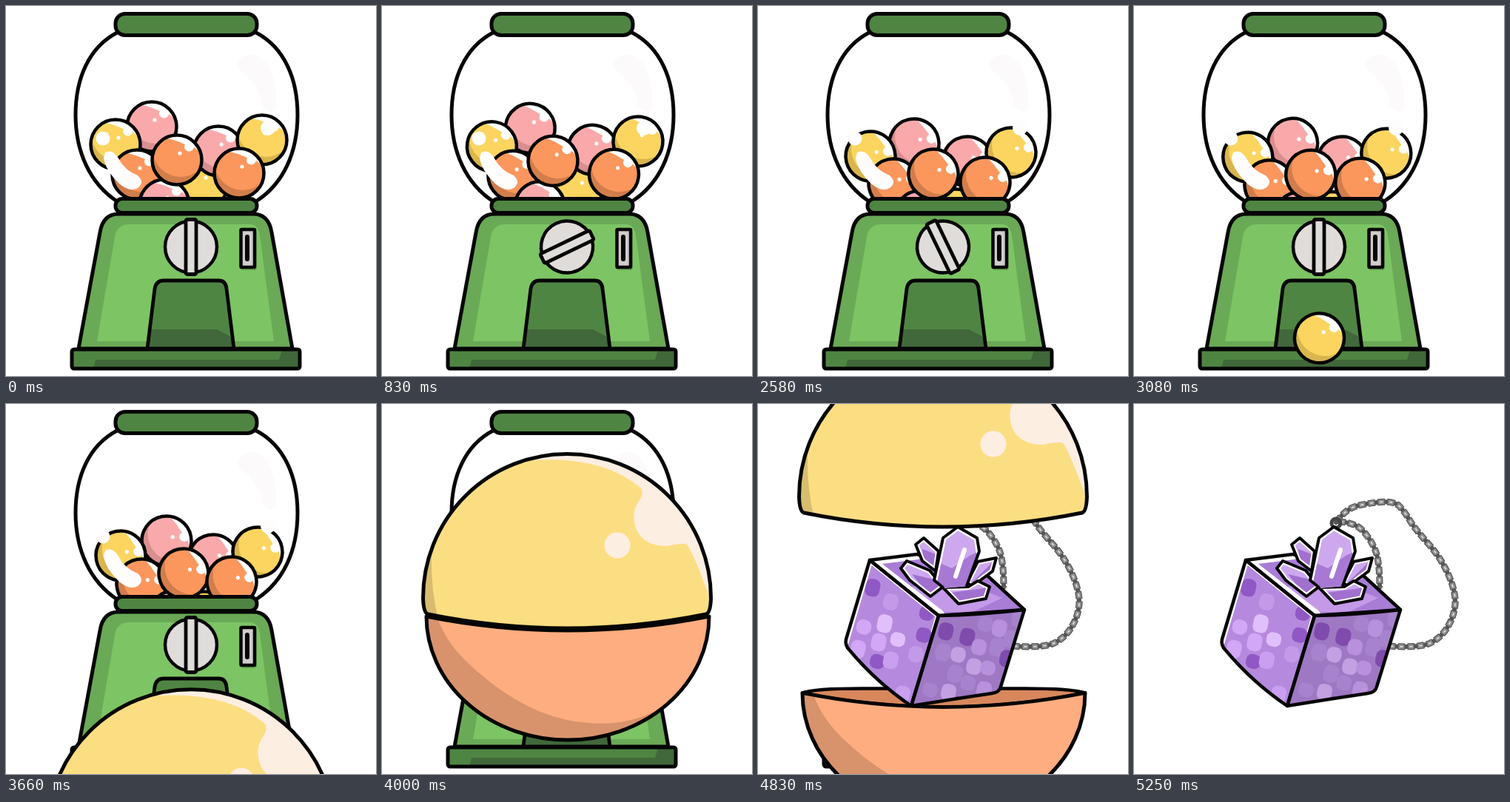
An HTML page with a canvas that plays this animation: 500 by 500 pixels, repeating every 7 s.

```html
<!DOCTYPE html>
<html lang="en">
<head>
<meta charset="utf-8">
<title>Gumball machine</title>
<style>
html, body { margin: 0; width: 100%; height: 100%; overflow: hidden; background: #fff; }
canvas { display: block; width: 500px; height: 500px; }
</style>
</head>
<body>
<canvas id="c" width="500" height="500"></canvas>
<script>
const ctx = document.getElementById('c').getContext('2d');
const LOOP = 7000, STEP = 1000 / 12;
const INK = '#050505', GREEN = '#4f8542', DEEP = '#41683a', METAL = '#dfdcda';
const TONES = {
  pink: ['#faa9ab', '#d98e8f'],
  orange: ['#fb975c', '#d27d4b'],
  yellow: ['#fbd55f', '#d9b54e']
};

// Ball centres at the steps in KEYS, back to front.
const KEYS = [4, 19, 31, 41];
const BALLS = [
  ['pink', [197, 205, 211, 217], [163, 169, 186, 185]],
  ['yellow', [148, 149, 152, 155], [187, 194, 203, 205]],
  ['orange', [177, 177, 183, 183], [228, 231, 240, 243]],
  ['yellow', [266, 264, 267, 267], [241, 257, 281, 287]],
  ['pink', [287, 281, 283, 280], [196, 192, 210, 210]],
  ['pink', [214, 212, 219, 227], [268, 275, 283, 286]],
  ['yellow', [346, 346, 342, 340], [181, 186, 198, 200]],
  ['orange', [231, 231, 237, 240], [208, 211, 227, 229]],
  ['orange', [315, 311, 307, 305], [226, 229, 238, 240]]
];
const TILT = [0, 0.35, 0.55, 0.6];

const path = d => new Path2D(d);
const GLOBE = path('M150 36C112 56 94 98 94 147C94 198 114 240 150 264H338C375 240 394 198 394 147C394 98 376 56 338 36Z');
const BODY = path('M98 463L127 306Q131 281 152 281H334Q355 281 359 306L387 463Z');
const BODY_LIGHT = path('M123 453L147 312Q150 295 166 295H329Q341 295 343 310L362 453Z');
const CHUTE = path('M191 463L201 382Q203 371 213 371H287Q297 371 298 382L308 463Z');
const UPPER = path('M62 284Q56 282 55.5 262A194.5 194.5 0 0 1 444.5 262Q444 282 438 284Q250 322 62 284Z');
const LOWER = path('M60 287Q250 325 442 287A191 167 0 0 1 60 287Z');

function fill(p, color) { ctx.fillStyle = color; ctx.fill(p); }
function line(p, w, color = INK) {
  ctx.lineWidth = w;
  ctx.strokeStyle = color;
  ctx.stroke(p);
}
function layer(fn) { ctx.save(); fn(); ctx.restore(); }
function inside(p, fn) { layer(() => { ctx.clip(p); fn(); }); }
function disc(x, y, r) { const p = new Path2D(); p.arc(x, y, r, 0, 7); return p; }
function box(x, y, w, h, r) { const p = new Path2D(); p.roundRect(x, y, w, h, r); return p; }

function keyed(values, f) {
  if (f <= KEYS[0]) return values[0];
  for (let i = 1; i < KEYS.length; i++) {
    if (f <= KEYS[i]) {
      const u = (f - KEYS[i - 1]) / (KEYS[i] - KEYS[i - 1]);
      return values[i - 1] + (values[i] - values[i - 1]) * u;
    }
  }
  return values[values.length - 1];
}

const BALL = disc(0, 0, 33.5);
const SHINE = path('M-16 -30A34 34 0 0 1 32 -10Q27 -14 23 -17Q21 -10 14 -12Q8 -15 11 -21Q-2 -27 -16 -30Z');

function ball(tone, x, y, tilt) {
  const [light, dark] = TONES[tone];
  layer(() => {
    ctx.translate(x, y);
    ctx.rotate(tilt);
    fill(BALL, dark);
    inside(BALL, () => {
      fill(disc(5, -15, 38), light);
      fill(SHINE, '#fff');
      fill(disc(4, -9, 2.6), '#fff');
    });
    line(BALL, 4.5);
  });
}

function globe(f) {
  fill(GLOBE, '#fff');
  fill(path('M313 76Q328 56 348 72Q368 98 365 138Q356 150 346 134Q344 110 320 90Q312 84 313 76Z'), '#fcfafa');
  line(GLOBE, 5);
  inside(GLOBE, () => {
    const tilt = keyed(TILT, f);
    for (const [tone, xs, ys] of BALLS) ball(tone, keyed(xs, f), keyed(ys, f), tilt);
  });
  fill(path('M134 198Q144 193 152 206Q160 222 178 229Q188 238 178 246Q168 252 154 241Q134 222 132 205Z'), '#fefdfc');
  fill(disc(131, 179, 9.5), '#fefdfc');
  fill(disc(354, 165, 10), '#fefdfc');
}

function knob(f) {
  const turn = Math.max(0, Math.min(1, (f - 5) / 28));
  layer(() => {
    ctx.translate(250, 325.5);
    ctx.rotate(turn * Math.PI * 2);
    const plate = disc(0, 0, 35), bar = box(-7, -37, 14, 74, 2);
    fill(plate, METAL);
    line(plate, 4.5);
    fill(bar, METAL);
    line(bar, 4.8);
  });
}

function fallingBall(f) {
  if (f < 32 || f > 41) return;
  const room = path('M201 382Q203 371 213 371H287Q297 371 298 382L308 463V500H191V463Z');
  inside(room, () => ball('yellow', 250.5, 333 + (f - 31) * 19.3, 0.2));
}

function machine(f) {
  globe(f);
  fill(BODY, '#6aa956');
  fill(BODY_LIGHT, '#7cc464');
  line(BODY, 5);
  for (const [y, h, r] of [[10.5, 29, 13], [260.5, 19, 9]]) {
    const p = box(148, y, 191, h, r);
    fill(p, GREEN);
    line(p, 5);
  }
  fill(box(317, 304, 22, 53, 3), '#6aa956');
  const slot = box(317.5, 302, 18.5, 51, 1);
  fill(slot, '#d0cccc');
  line(slot, 4.5);
  line(path('M326 312V342'), 6);
  knob(f);
  fill(CHUTE, GREEN);
  inside(CHUTE, () => fill(path('M190 437H285L310 450V465H190Z'), DEEP));
  line(CHUTE, 4.8);
  const base = box(89, 464, 308, 26, 3);
  fill(base, GREEN);
  inside(base, () => fill(path('M118 490L121 478H369L373 464H398V490Z'), DEEP));
  line(base, 5);
  fallingBall(f);
}

function upperHalf() {
  fill(UPPER, '#fcde82');
  inside(UPPER, () => {
    fill(path('M67 205Q66 250 76 292H50V205Z'), '#d8bd70');
    fill(path('M203 76Q300 70 350 114Q354 120 348 130Q336 146 343 168Q353 192 385 192Q404 188 411 189Q418 194 443 262H460V40H203Z'), '#fdeee2');
    fill(disc(318, 191, 17.5), '#fdeee2');
  });
  line(UPPER, 5);
}

function lowerHalf() {
  fill(LOWER, '#fdad80');
  inside(LOWER, () =>
    fill(path('M74 286Q84 318 112 346Q180 412 250 427Q325 442 378 410L360 470H40V286Z'), '#d8936c'));
  line(LOWER, 5);
}

function random(seed) {
  return () => (seed = (seed * 16807) % 2147483647) / 2147483647;
}

function patches(face, x0, y0, slope, tones, seed) {
  const rnd = random(seed);
  inside(face, () => {
    for (let row = 0; row < 7; row++) {
      for (let col = 0; col < 6; col++) {
        const x = x0 + col * 24 - row * 8 + rnd() * 6;
        const y = y0 + row * 27 + col * slope + (col % 2) * 8 + rnd() * 6;
        const tone = tones[Math.floor(rnd() * tones.length)];
        layer(() => {
          ctx.translate(x, y);
          ctx.rotate(0.2);
          fill(box(-10, -11, 20, 19 + rnd() * 6, 8), tone);
        });
      }
    }
  });
}

function smooth(pts) {
  const p = new Path2D();
  p.moveTo(...pts[0]);
  for (let i = 1; i < pts.length - 1; i++) {
    const [x, y] = pts[i], [nx, ny] = pts[i + 1];
    const last = i === pts.length - 2;
    p.quadraticCurveTo(x, y, last ? nx : (x + nx) / 2, last ? ny : (y + ny) / 2);
  }
  return p;
}

function chain(pts) {
  const p = smooth(pts);
  layer(() => {
    line(p, 6, '#555');
    ctx.lineCap = 'butt';
    ctx.setLineDash([10, 3]);
    line(p, 9, '#555');
    ctx.lineDashOffset = -1;
    ctx.setLineDash([8, 5]);
    line(p, 6.5, '#8c8c8c');
    ctx.lineDashOffset = -3;
    ctx.setLineDash([4, 9]);
    line(p, 2, '#d8d8d8');
  });
}

function crystal(outline, shade) {
  const p = path(outline);
  fill(p, '#cda8ef');
  inside(p, () => {
    fill(path(shade), '#a170cf');
    line(p, 8, '#fff');
  });
  line(p, 4);
}

const LEFT = path('M151 211L244 286L207 408Q160 376 124 333Q117 326 119 318Z');
const RIGHT = path('M244 286L360 278L328 382Q326 390 316 391Q262 399 207 408Z');
const TOP = path('M151 211L215 203L310 232L360 278Q300 285 244 286Z');

function gift() {
  chain([[273, 160], [286, 142], [315, 134], [352, 131], [366, 146], [379, 168], [415, 208], [435, 254], [433, 286], [415, 316], [386, 330], [342, 327]]);
  chain([[276, 159], [299, 160], [320, 183], [332, 212], [332, 248]]);
  line(disc(273, 161, 6), 5, '#444');

  fill(LEFT, '#b58ade');
  patches(LEFT, 155, 246, 9, ['#d2a8f6', '#c9a0f0', '#e0c0fb', '#b58ade', '#c29ae8', '#9058c4'], 17);
  fill(RIGHT, '#9f78c4');
  patches(RIGHT, 254, 304, -4, ['#b791dc', '#c3a0e2', '#9f78c4', '#a883cd', '#7f4cae'], 41);
  fill(TOP, '#a97dd6');
  inside(TOP, () => {
    fill(path('M205 248L260 234L330 262L290 281H248Z'), '#c49ae8');
    line(path('M150 213L244 286'), 17, '#fff');
    line(path('M150 211L216 203'), 14, '#fff');
    line(path('M244 287L362 279'), 5, '#d9b7f5');
  });
  inside(LEFT, () => {
    line(path('M151 211L118 322'), 9, '#fff');
    line(path('M151 211L244 286L238 307'), 8, '#fff');
  });
  for (const face of [TOP, LEFT, RIGHT]) line(face, 4.5);

  crystal('M213 190L224 181L244 199L240 226L222 212Z', 'M222 196L243 204V228L224 215Z');
  crystal('M282 242L297 213L322 208L317 226L290 246Z', 'M284 246L322 209L316 230Z');
  crystal('M193 222L201 212L232 225L250 247L233 260L205 238Z', 'M208 230L250 240L234 262Z');
  crystal('M250 248L284 247L297 239L313 247L308 263L271 270Z', 'M254 256L312 248L306 266L272 272Z');
  const spire = path('M238 238L250 181L270 166L296 181L299 199L284 246L251 249Z');
  fill(spire, '#cda8ef');
  inside(spire, () => {
    fill(path('M238 240L246 215L262 222L286 205L299 199L284 248H251Z'), '#a779d4');
    line(path('M238 238L250 181L270 166L296 181L299 199'), 9, '#fff');
    line(path('M279 197L267 233'), 6, '#fff');
  });
  line(path('M250 248L238 238L250 181L270 166L296 181L299 199L282 246'), 4);
}

function capsule(f) {
  if (f < 53) {
    layer(() => {
      ctx.translate(0, 435 * Math.pow((48 - Math.min(f, 48)) / 5, 1.4));
      lowerHalf();
      upperHalf();
    });
    return;
  }
  const open = Math.pow((f - 52) / 3, 1.37);
  const up = 53 * open, down = 40 * open;
  ctx.fillStyle = '#fff';
  ctx.fillRect(60, 275 - up, 380, 13 + up + down);
  layer(() => {
    ctx.translate(0, down);
    const rim = path('M60 287Q75 281 140 281H360Q425 281 442 287Q250 325 60 287Z');
    fill(rim, '#d8875c');
    line(rim, 4.5);
  });
  gift();
  layer(() => { ctx.translate(0, down); lowerHalf(); });
  layer(() => { ctx.translate(0, -up); upperHalf(); });
}

function draw(f) {
  ctx.fillStyle = '#fff';
  ctx.fillRect(0, 0, 500, 500);
  ctx.lineJoin = ctx.lineCap = 'round';
  if (f >= 63) return gift();
  machine(f);
  if (f >= 44) capsule(f);
}

const start = performance.now();
function tick() {
  const t = (performance.now() - start) % LOOP;
  draw(Math.floor((Math.floor(t / 10) * 10 + 9.9) / STEP));
  requestAnimationFrame(tick);
}
tick();
</script>
</body>
</html>
```
